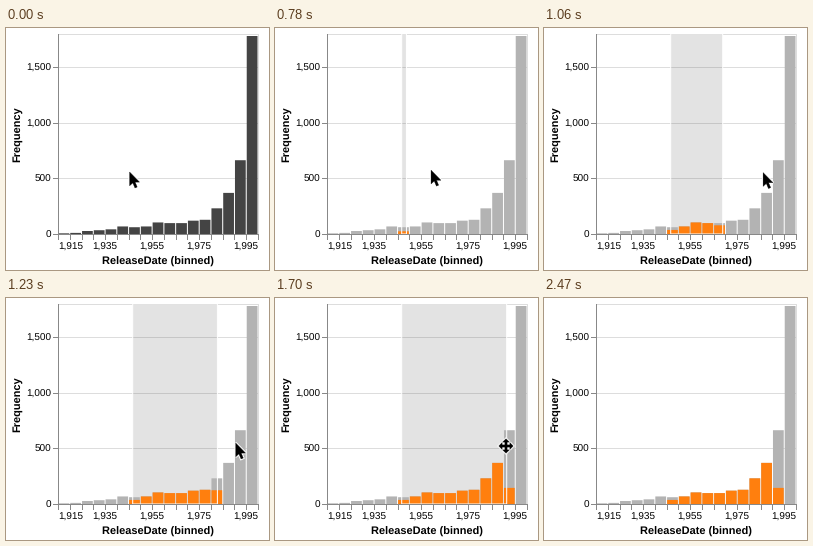
These frames come from a looping animation (263 by 242 pixels, 2.49 s). A matplotlib script:

```python
import numpy as np
import matplotlib.pyplot as plt
from matplotlib.animation import FuncAnimation
from matplotlib.patches import Polygon, Rectangle
from matplotlib.patheffects import withStroke

plt.rcParams["font.family"] = "Liberation Sans"
plt.rcParams["text.hinting"] = "none"

W, H, DPI = 263, 242, 72          # at 72 dpi one point is one pixel
LOOP, DT = 2490, 10
LEFT, TOP, SIZE = 52, 6, 200
BASE = TOP + SIZE
YEAR0, YEARS, BIN, Y_MAX = 1915, 85, 5, 1800
STEP = SIZE * BIN / YEARS
DARK, LIGHT, ORANGE = "#444444", "#b3b3b3", "#ff7f0e"
AXIS, GRID = "#888888", "#dddddd"

# Films per five-year bin
COUNTS = [6, 10, 27, 34, 42, 68, 61, 68, 104, 98, 98, 120, 128, 231, 370,
          664, 1782]

# Timeline in ms; the screen refreshes once per TICK
TICK = 170 / 3
BLINK, ENTER, BRUSH_ON, GRAB, LEAVE, GONE, BRUSH_OFF = (
    60, 660, 770, 1700, 1880, 2110, 2470)
BRUSH_X0, BRUSH_X1 = 126.7, 231.7

ARROW = np.array([(0, 0), (0, 13.8), (3.2, 10.9), (5.4, 16), (7.6, 15),
                  (5.5, 10.1), (9.9, 10.1)])
ARM = np.array([(-1.1, -1.1), (-1.1, -3.9), (-3.4, -3.9), (0, -7.2),
                (3.4, -3.9), (1.1, -3.9)])
TURN = np.array([(0, 1), (-1, 0)])
MOVE = np.vstack([ARM @ np.linalg.matrix_power(TURN, k) for k in range(4)])

fig = plt.figure(figsize=(W / DPI + 1e-6, H / DPI + 1e-6), dpi=DPI,
                 facecolor="white")
ax = fig.add_axes([0, 0, 1, 1])
ax.set_xlim(0, W)
ax.set_ylim(H, 0)
ax.axis("off")


def line(xs, ys, color, z):
    """One-pixel line through pixel centres."""
    ax.plot(np.add(xs, 0.5), np.add(ys, 0.5), color=color, lw=1, zorder=z,
            snap=False, solid_capstyle="projecting")


def box(x, y, w, h, z, **style):
    return ax.add_patch(Rectangle((x, y), w, h, zorder=z, snap=False,
                                  **style))


def bars(color, z):
    return [box(LEFT + i * STEP + 0.5, BASE, STEP - 1, 0, z, fc=color, lw=0)
            for i in range(len(COUNTS))]


def set_height(bar, count):
    bar.set_height(-count * SIZE / Y_MAX)


def label(x, y, text, ha, **kw):
    ax.text(x, y, text, ha=ha, va="baseline", color="black", zorder=7, **kw)


# Frame, grid and axes
line([LEFT, LEFT + SIZE, LEFT + SIZE], [TOP, TOP, BASE], GRID, 1)
for v in range(0, 1501, 500):
    y = TOP + round(SIZE * (1 - v / Y_MAX))
    line([LEFT, LEFT + SIZE], [y, y], GRID, 1)
    line([LEFT - 5, LEFT], [y, y], AXIS, 6)
    label(LEFT - 7, y + 4, f"{v:,}", "right", size=10)
line([LEFT, LEFT, LEFT + SIZE], [TOP, BASE, BASE], AXIS, 6)
for i in range(len(COUNTS) + 1):
    x = LEFT + round(i * STEP)
    line([x, x], [BASE, BASE + 5], AXIS, 6)
    if i % 4 == 0:
        label(x, 221.6, f"{YEAR0 + i * BIN:,}", "center" if i else "left",
              size=10)
label(LEFT + SIZE / 2, 236.8, "ReleaseDate (binned)", "center", size=11,
      weight="bold")
label(14.2, TOP + SIZE / 2 + 0.5, "Frequency", "center", size=11,
      weight="bold", rotation=90, rotation_mode="anchor")

# Moving parts
back = bars(DARK, 3)
front = bars(ORANGE, 4)
for bar, count in zip(back, COUNTS):
    set_height(bar, count)
shade = box(BRUSH_X0, TOP, 1, SIZE, 2, fc="#333333", alpha=0.135, lw=0)
rim = box(BRUSH_X0, TOP, 1, SIZE, 5, fc="none", ec="white", lw=1)
cursor = ax.add_patch(Polygon(ARROW, fc="black", ec="black", lw=0.3,
                              zorder=9, snap=False))
cursor.set_path_effects([withStroke(linewidth=2.4, foreground="white")])


def selected(i, lo, hi):
    """Share of bin i whose years lie between lo and hi."""
    p = 1 + 0.22 * max(0, i - 12)     # late bins fill faster and faster
    years = YEAR0 + i * BIN + np.arange(BIN)
    share = np.diff((np.arange(BIN + 1) / BIN) ** p)
    return share[(years >= lo) & (years <= hi)].sum()


def to_year(x):
    return YEAR0 + (x - LEFT) / SIZE * YEARS


def progress(t, start, end):
    return np.clip((t - start) / (end - start), 0, 1)


def held(now, start):
    """Time of the latest screen refresh, counted from start."""
    return start + (now - start + DT / 2) // TICK * TICK


def brush_edge(t):
    u = progress(t, 675, 1443)
    return BRUSH_X0 + (BRUSH_X1 - BRUSH_X0) * u * u * (3 - 2 * u)


def pointer(now, t):
    """Pointer position: ease out to the right, then fall off the stage."""
    if now < BLINK:
        return np.array([123.6, 144])
    if now < GRAB:
        u = 1 - (1 - progress(t, 690, 1230)) ** 2
        return np.array([126.7 + 103 * u, 141 + 4 * u])
    v = progress(t, LEAVE - TICK, GONE) if now >= LEAVE else 0
    return np.array([231 - 10 * v, 148 + 95 * v * v])


def update(frame):
    now = frame * DT
    t = held(now, LEAVE if now >= LEAVE else ENTER)

    brushed = now >= BRUSH_ON
    edge = brush_edge(t)
    for part in (shade, rim):
        part.set_visible(brushed and now < BRUSH_OFF)
        part.set_width(edge - BRUSH_X0)
    lo, hi = to_year(BRUSH_X0), to_year(edge)
    for i, count in enumerate(COUNTS):
        back[i].set_facecolor(LIGHT if brushed else DARK)
        set_height(front[i], count * selected(i, lo, hi) if brushed else 0)

    pos = pointer(now, t)
    on_brush = now >= GRAB and pos[1] < BASE
    cursor.set_visible(now < BLINK or ENTER <= now < GONE)
    cursor.set_xy((MOVE if on_brush else ARROW) + pos)
    return [shade, rim, cursor, *back, *front]


anim = FuncAnimation(fig, update, frames=LOOP // DT, interval=DT,
                     repeat=True, repeat_delay=0, blit=False)
plt.show()
```
